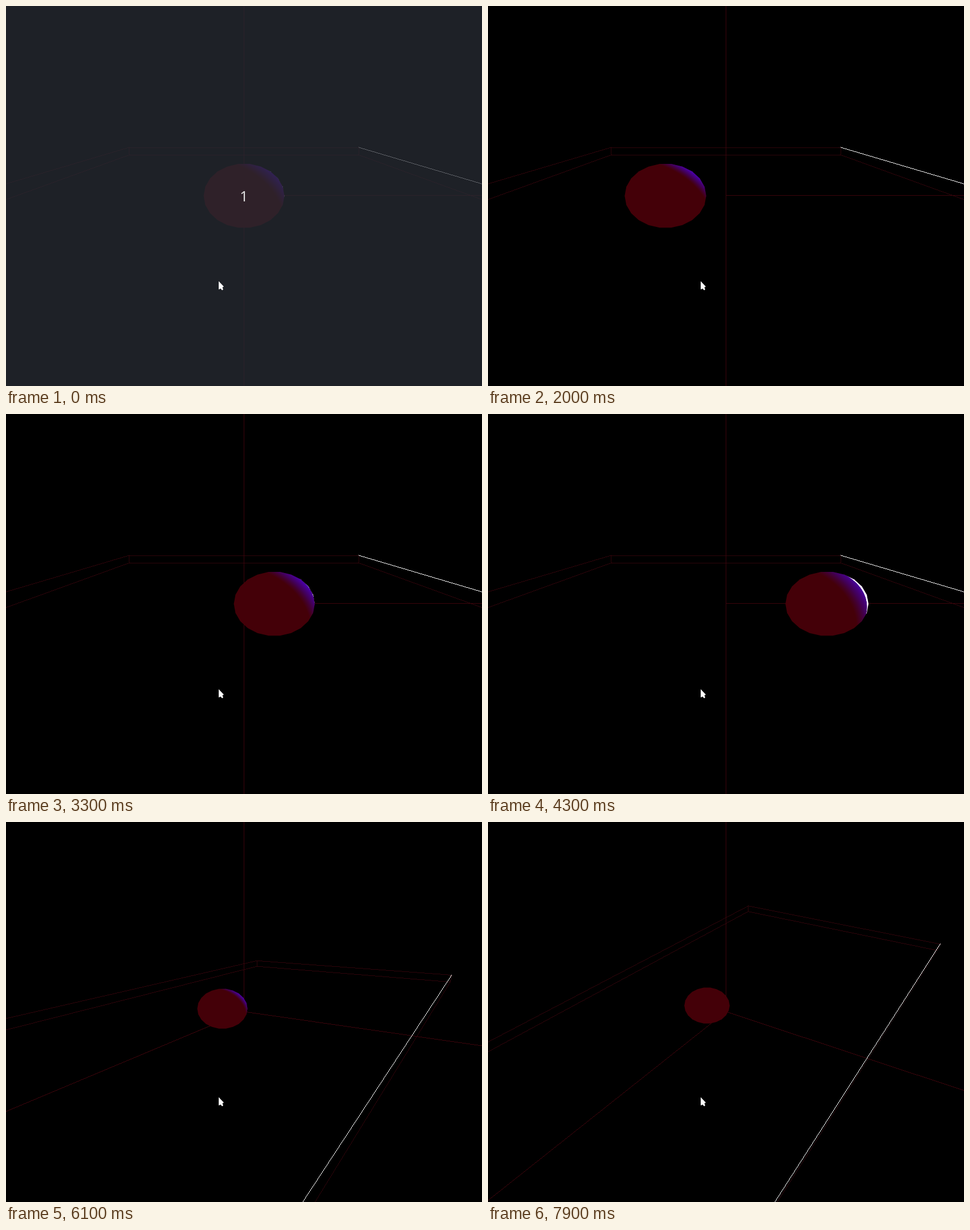
These frames come from a looping animation (837 by 669 pixels, 8000 ms). An HTML page with a canvas:

```html
<!DOCTYPE html>
<html lang="en">
<head>
<meta charset="utf-8">
<title>Ball on a board</title>
<style>
  html, body { margin: 0; width: 837px; height: 669px; overflow: hidden; background: #000; }
  canvas, svg, #veil { position: absolute; left: 0; top: 0; width: 837px; height: 669px; }
  #veil {
    background: rgba(40, 44, 52, .75);
    color: #dedede;
    font: 25px/669px "Noto Sans", "Open Sans", sans-serif;
    text-align: center;
  }
</style>
</head>
<body>
<canvas id="stage" width="837" height="669"></canvas>
<div id="veil">1</div>
<svg viewBox="0 0 837 669"><path fill="#fff" d="M374 484.5L383 494L380.5 495.5L382 499L380 500.5L377.5 497.5L374 499Z"/></svg>
<script>
const W = 837, H = 669, LOOP = 8000, TICK = 100;
const FOCAL = Math.sqrt(3), RADIUS = 2, NEAR = 0.1, SIDES = 22;
const AXIS = '#3c040b', EDGE = '#2e040a', LIT = '#fff', BALL = '#440008';

const veil = document.getElementById('veil');
const ctx = document.getElementById('stage').getContext('2d');
const rad = deg => deg * Math.PI / 180;

// Ball position, camera elevation, azimuth and distance, rim light angle, half width and depth
const start = { x: 0, el: 14.036, az: 0, dist: 20.616, ang: -40, half: 62, deep: 1.5 };

// First tick, number of ticks, values reached on the last one
const moves = [
  [1500, 1, { x: -0.5 }],
  [2000, 1, { x: -3 }],
  [2100, 2, { x: -6 }],
  [2400, 1, { x: -5.5 }],
  [2900, 1, { x: -4.5 }],
  [3000, 4, { x: 1.5 }],
  [3400, 2, { x: 6 }],
  [4300, 1, { x: 5 }],
  [4400, 4, { x: -1 }],
  [4800, 1, { x: -2 }],
  [5300, 1, { el: 54.96, az: 6.76, dist: 34.9, ang: 34, half: 63, deep: 0.4 }],
  [5800, 7, { el: -9.9, az: 48, dist: 30, ang: -88, half: 65, deep: 0.9 }],
  [6700, 1, { el: -5.02, az: 48.4, half: 60, deep: 0.7 }],
  [7200, 4, { el: 43.7, az: 35, dist: 35.5, half: 5 }],
  [7700, 1, { el: 42, az: 34, dist: 35.7 }],
  [7900, 1, { el: 39.95, az: 32.87, dist: 35.76 }]
];

function poseAt(t) {
  const pose = { ...start };
  for (const [from, count, goal] of moves) {
    if (t < from) break;
    const k = Math.min(count, Math.floor((t - from) / TICK) + 1) / count;
    for (const key in goal) pose[key] += (goal[key] - pose[key]) * k;
  }
  return pose;
}

// World to camera space: right, up, depth
function makeView({ el, az, dist }) {
  const se = Math.sin(rad(el)), ce = Math.cos(rad(el));
  const sa = Math.sin(rad(az)), ca = Math.cos(rad(az));
  return ([x, y, z]) => {
    const toward = x * sa + z * ca;
    return [x * ca - z * sa, y * ce - toward * se, dist - toward * ce - y * se];
  };
}

const project = ([r, u, d]) => [W / 2 * (1 + FOCAL * r / d), 333.9 - H / 2 * FOCAL * u / d];

// One hard pixel per step along the longer direction
function pixelLine([x0, y0], [x1, y1], color) {
  ctx.fillStyle = color;
  const flat = Math.abs(x1 - x0) > Math.abs(y1 - y0);
  let [a, b, c, d] = flat ? [x0, y0, x1, y1] : [y0, x0, y1, x1];
  if (a > c) [a, b, c, d] = [c, d, a, b];
  const slope = (d - b) / (c - a || 1);
  const end = Math.min(flat ? W : H, Math.floor(c) + 1);
  for (let i = Math.max(0, Math.floor(a)); i < end; i++) {
    const j = Math.floor(b + (i + 0.5 - a) * slope);
    if (flat) ctx.fillRect(i, j, 1, 1); else ctx.fillRect(j, i, 1, 1);
  }
}

function segment(view, from, to, color) {
  let p = view(from), q = view(to);
  if (p[2] < NEAR && q[2] < NEAR) return;
  if (p[2] < NEAR) [p, q] = [q, p];
  if (q[2] < NEAR) {
    const k = (p[2] - NEAR) / (p[2] - q[2]);
    q = p.map((v, i) => v + (q[i] - v) * k);
  }
  pixelLine(project(p), project(q), color);
}

function drawBoard(view) {
  const X = 12.5, Y = 0.5, Z = 25, far = 100, sign = [-1, 1];
  for (const i of sign) for (const j of sign) {
    segment(view, [-X, i * Y, j * Z], [X, i * Y, j * Z], EDGE);
    segment(view, [i * X, -Y, j * Z], [i * X, Y, j * Z], EDGE);
    segment(view, [i * X, j * Y, -Z], [i * X, j * Y, Z], EDGE);
  }
  for (const tip of [[far, 0, 0], [0, far, 0], [0, 0, far]]) segment(view, [0, 0, 0], tip, AXIS);
  segment(view, [X, Y, -Z], [X, Y, Z], LIT);
}

// Crescent on the unit disc, facing ang and spreading half degrees both ways
function crescent(ang, half, deep, stops) {
  if (half <= 0) return;
  const cx = -deep * Math.cos(rad(ang)), cy = -deep * Math.sin(rad(ang));
  const inner = Math.sqrt(1 + deep * deep + 2 * deep * Math.cos(rad(half)));
  const g = ctx.createRadialGradient(cx, cy, inner, cx, cy, 1 + deep);
  stops.forEach(([at, color]) => g.addColorStop(at, color));
  ctx.fillStyle = g;
  ctx.fill();
}

function drawBall(view, { x, ang, half, deep }) {
  const [r, u, d] = view([x, 0, 0]);
  const k = d * d / (d * d - RADIUS * RADIUS);
  const [cx, cy] = project([r * k, u * k, d]);
  const size = FOCAL * RADIUS / Math.sqrt(d * d - RADIUS * RADIUS);
  ctx.save();
  ctx.translate(cx, cy + 0.3);
  ctx.scale(W / 2 * size * Math.hypot(1, r / d), H / 2 * size * Math.hypot(1, u / d));
  ctx.beginPath();
  for (let i = 0; i < SIDES; i++) {
    const a = 2 * Math.PI * i / SIDES;
    ctx.lineTo(Math.cos(a) * 1.004, Math.sin(a) * 1.004);
  }
  ctx.closePath();
  ctx.fillStyle = BALL;
  ctx.fill();
  crescent(ang + 2 * x, half + 2.5 * x, deep,
    [[0, 'rgba(66,0,90,0)'], [0.5, 'rgba(66,0,120,.7)'], [1, 'rgb(74,0,180)']]);
  crescent(-22, 12 + 6 * x, Math.max(0.05, 0.05 + 0.04 * x),
    [[0, 'rgba(255,255,255,0)'], [0.15, '#fff'], [1, '#fff']]);
  ctx.restore();
}

let last = -1;
function frame(now) {
  const t = Math.floor(now % LOOP / TICK) * TICK;
  if (t !== last) {
    last = t;
    const pose = poseAt(t), view = makeView(pose);
    ctx.fillStyle = '#000';
    ctx.fillRect(0, 0, W, H);
    drawBoard(view);
    drawBall(view, pose);
    veil.style.visibility = t < 500 ? 'visible' : 'hidden';
  }
  requestAnimationFrame(frame);
}
frame(performance.now());
</script>
</body>
</html>
```
